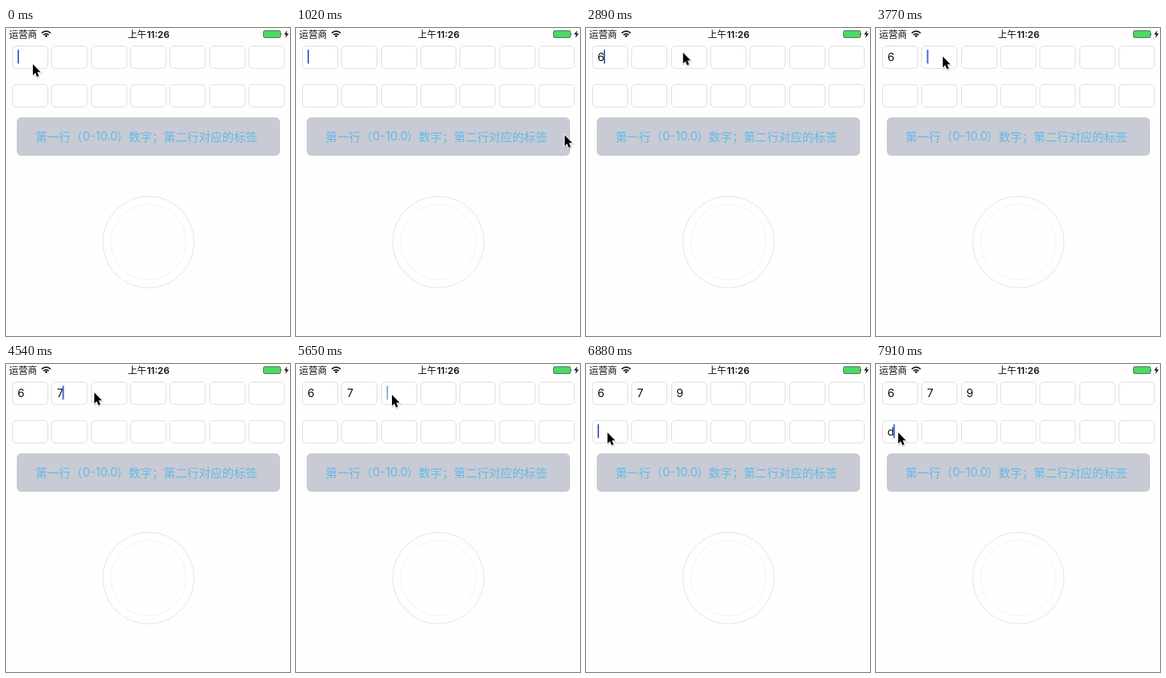
Recreate the animation shown at these times as an HTML page. Size 370 by 400 pixels, loop 8000 ms.

```html
<!DOCTYPE html>
<html lang="zh-CN">
<head>
<meta charset="utf-8">
<title>表单输入</title>
<style>
html, body { margin: 0; width: 100%; height: 100%; overflow: hidden; background: #fefefe; }
svg { display: block; width: 370px; height: 400px; }
text { font-family: "Noto Sans CJK SC", "Noto Sans CJK", sans-serif; }
.latin { font-family: Inter, Roboto, sans-serif; }
.status { font-size: 12.2px; fill: #111; }
.label { font-size: 15.25px; fill: #62b9ea; }
.value { font-size: 14.6px; fill: #111; }
.box { fill: #fff; stroke: #dedede; }

.caret { fill: #4468d8; animation: place 8s step-end infinite, blink 8s linear infinite; }
.pointer { animation: move 8s linear infinite; }
.v1 { animation: v1 8s step-end infinite; }
.v2 { animation: v2 8s step-end infinite; }
.v3 { animation: v3 8s step-end infinite; }
.v4 { animation: v4 8s step-end infinite; }

@keyframes v1 { 0% { opacity: 0 } 30.31%, 100% { opacity: 1 } }
@keyframes v2 { 0% { opacity: 0 } 52.31%, 100% { opacity: 1 } }
@keyframes v3 { 0% { opacity: 0 } 74.56%, 100% { opacity: 1 } }
@keyframes v4 { 0% { opacity: 0 } 98.81%, 100% { opacity: 1 } }

@keyframes place {
  0% { transform: translate(15px, 28px) }
  30.31% { transform: translate(23px, 28px) }
  42.15% { transform: translate(66.3px, 28px) }
  52.31% { transform: translate(73.5px, 28px) }
  65% { transform: translate(118px, 28px) }
  74.56% { transform: translate(126px, 28px) }
  85.9% { transform: translate(15px, 78px) }
  98.81%, 100% { transform: translate(22.6px, 78px) }
}
@keyframes blink {
  0%, 3.25% { opacity: 1 }
  4.875%, 9.25% { opacity: 0 }
  10.25%, 16.125% { opacity: 1 }
  17.75%, 20.5% { opacity: 0 }
  21.5%, 26.9% { opacity: 1 }
  28.6%, 30.3% { opacity: 0 }
  30.31%, 38.25% { opacity: 1 }
  39.875%, 42.18% { opacity: 0 }
  42.19%, 50.125% { opacity: 1 }
  51.75%, 52.3% { opacity: 0 }
  52.31%, 60.125% { opacity: 1 }
  61.5%, 65.05% { opacity: 0 }
  65.06%, 69.875% { opacity: 1 }
  71.625%, 74.55% { opacity: 0 }
  74.56%, 82.125% { opacity: 1 }
  83.75%, 85.93% { opacity: 0 }
  85.94%, 93.75% { opacity: 1 }
  95.5%, 98.8% { opacity: 0 }
  98.81%, 100% { opacity: 1 }
}
@keyframes move {
  0% { transform: translate(35px, 47px) }
  3.25% { transform: translate(35px, 47px); animation-timing-function: ease-in-out }
  7.375%, 12.125% { transform: translate(353px, 141px) }
  12.75% { transform: translate(350px, 139px) }
  16.5% { transform: translate(341px, 133px) }
  21.5%, 27% { transform: translate(336px, 130px) }
  27.375% { transform: translate(333px, 128px) }
  31.25% { transform: translate(265px, 89px) }
  33.75% { transform: translate(200px, 56px) }
  36.125% { transform: translate(127px, 32px) }
  36.75%, 38.25% { transform: translate(98px, 28px) }
  40.375%, 46% { transform: translate(86px, 37px) }
  47.125%, 50.125% { transform: translate(87px, 37px) }
  56.75% { transform: translate(115px, 37px) }
  59.875%, 74.625% { transform: translate(125px, 40px) }
  77.5% { transform: translate(114px, 58px) }
  80.25% { transform: translate(83px, 91px) }
  81.75% { transform: translate(55px, 101px) }
  83.75%, 88.95% { transform: translate(28px, 89px) }
  89%, 100% { transform: translate(29px, 89px) }
}
</style>
</head>
<body>
<svg viewBox="0 0 370 400">
  <text class="status" x="4" y="12.7">运营商</text>
  <g fill="none" stroke="#111" stroke-width="1.7">
    <path d="M46.6 6.6a8 8 0 0 1 11.4 0M48.8 9a4.9 4.9 0 0 1 7 0"/>
    <path d="M52.3 12.3L50.3 10.3a2.9 2.9 0 0 1 4 0Z" fill="#111" stroke="none"/>
  </g>
  <text class="status" x="158.7" y="12.7" font-weight="500">上午</text>
  <text class="status latin" x="183.4" y="12.5" font-weight="600">11:26</text>
  <rect x="335.5" y="3.5" width="22" height="9" rx="1.5" fill="#4cd964" stroke="#3c5a42" stroke-width=".8"/>
  <path d="M358.6 6.3q1.7 1.7 0 3.4Z" fill="#222"/>
  <path d="M366.4 3L362.3 8.6H365L364 13L368.3 7.2H365.5Z" fill="#111"/>

  <g id="fields"></g>

  <rect x="14" y="116" width="343" height="50" rx="6" fill="#c8cbd3"/>
  <text class="label" x="38.6" y="146.7">第一行（</text>
  <text class="label latin" x="99.8" y="146.4">0-10.0</text>
  <text class="label" x="144.6" y="146.7">）数字；第二行对应的标签</text>

  <circle cx="185.5" cy="278" r="59.5" fill="none" stroke="#e4e4e4"/>
  <circle cx="185.5" cy="278" r="49" fill="none" stroke="#f2f2f2"/>

  <text class="value latin v1" x="15" y="42.5">6</text>
  <text class="value latin v2" x="66.4" y="42.5">7</text>
  <text class="value latin v3" x="117.8" y="42.5">9</text>
  <text class="value latin v4" x="14.8" y="92.7">d</text>
  <rect class="caret" width="2" height="18.5" rx="1"/>

  <g class="pointer">
    <path d="M0 0V14.2L3.2 11.3 5.4 16.4 7.9 15.3 5.7 10.3H10Z" transform="translate(.6 1.2)" fill="#000" opacity=".16" stroke="#000" stroke-width="2"/>
    <path d="M0 0V14.2L3.2 11.3 5.4 16.4 7.9 15.3 5.7 10.3H10Z" fill="#000" stroke="#fff" stroke-width="1.8" paint-order="stroke"/>
  </g>
</svg>
<script>
const fields = document.getElementById('fields');
for (const y of [23.5, 73.5]) {
  for (let i = 0; i < 7; i++) {
    const box = document.createElementNS(fields.namespaceURI, 'rect');
    const attrs = { class: 'box', x: Math.round(8 + i * 51.35) + .5, y, width: 46, height: 29, rx: 4.5 };
    for (const key in attrs) box.setAttribute(key, attrs[key]);
    fields.append(box);
  }
}
</script>
</body>
</html>
```
